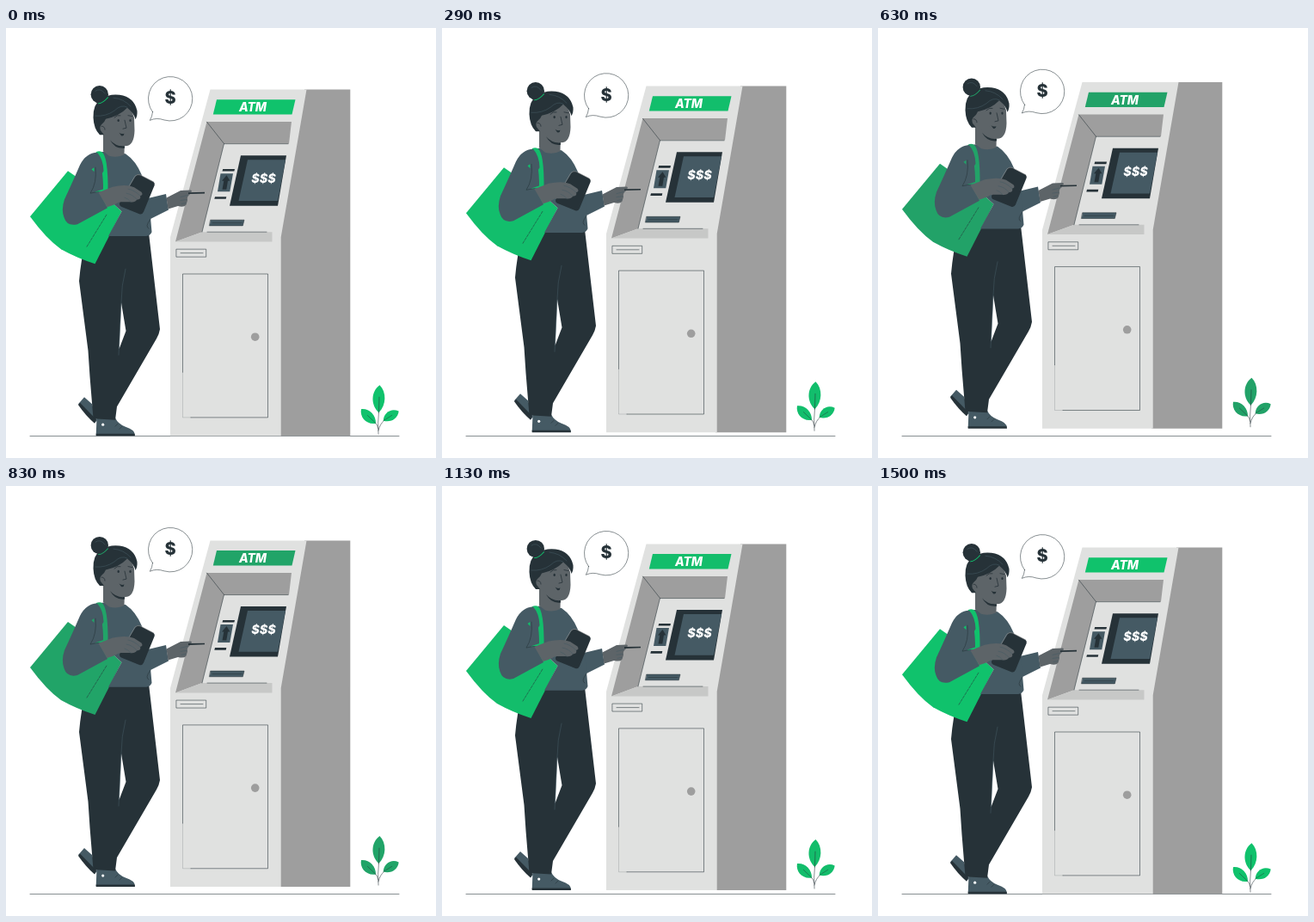
An HTML page that plays this animation: 500 px wide and 500 px high, repeating every 1.54 s.

```html
<!DOCTYPE html>
<html lang="en">
<head>
<meta charset="utf-8">
<title>At the cash machine</title>
<style>
  html, body { margin: 0; width: 100%; height: 100%; overflow: hidden; background: #fff; }
  svg { display: block; width: 100%; height: 100%; }
  text { font-family: Inter, sans-serif; font-weight: 800; text-anchor: middle; }
  .dark { fill: #263238; }
  .slate { fill: #455a64; }
  .skin { fill: #5d6468; }
  .grey { fill: #9e9e9e; }
  .light { fill: #e0e1e0; }
  .green { fill: var(--green); }
  .white { fill: #fff; }
  .line { fill: none; stroke: #263238; stroke-width: .55; stroke-linecap: round; stroke-linejoin: round; }
</style>
</head>
<body>
<svg viewBox="0 0 500 500">
  <defs>
    <g id="leaf">
      <path class="green" d="M0 0C-10 -9 -9 -25 1 -32C9 -24 9 -9 0 0Z"/>
      <path class="line" d="M0 0L.5 -18"/>
    </g>
  </defs>
  <path class="line" d="M28 474.5H457"/>
  <g id="scene">
    <g id="bubble">
      <path class="line" d="M170.5 97.5A25.7 25.7 0 1 1 184 106.8Q175 103.6 167.3 107.2Q170 103 170.5 97.5Z"/>
      <text class="dark" x="191" y="88.2" font-size="20">$</text>
    </g>

    <g id="machine">
      <path class="grey" d="M347 71.3H400.3V474H318V242Z"/>
      <path class="light" d="M237.5 71.3H349.5L319.7 243V474H191V243Z"/>
      <path class="green" d="M245 83H336.5L332.5 100.3H240.8Z"/>
      <text class="white" x="287" y="97" font-size="14" font-style="italic">ATM</text>
      <path class="grey" d="M233.5 108.8H332L329 134.3H253.5L228 237L197 248.3Z"/>
      <path d="M228 237H309.5V248.3H197Z" fill="#c7c8c7"/>
      <path class="line" d="M233.5 109L253.5 134.3L228 237M253.5 134.5H328M234 237H303"/>
      <path class="dark" d="M273 148H326L316 206.5H260Z"/>
      <path class="slate" d="M281 153H325L316 200.7H270.5Z"/>
      <text class="white" x="299.5" y="180" font-size="14.4" font-style="italic">$$$</text>
      <path class="dark" d="M252.2 163.8H266L265.4 166.4H251.5ZM243 196H256.3L255.7 198.6H242.3Z"/>
      <path class="slate" d="M249.5 169H264L260.3 190H246Z"/>
      <path class="dark" d="M256.5 171L260.5 177.5H258L256.3 187.5H251.5L253.3 177.5H251Z"/>
      <path class="slate" d="M238 223H277L275.3 229.7H236.7Z"/>
      <path class="line" d="M238 223H277L275.3 229.7H236.7ZM240 226.5H274"/>
      <path class="line" d="M198.3 257H232.7V266H198.3ZM203 261.5H229"/>
      <path class="line" d="M205.5 400V285.8H304.5V452.7H215"/>
      <path class="line" d="M205.5 400V452.7H215" opacity=".3"/>
      <circle class="grey" cx="289.7" cy="359" r="4.8"/>
    </g>

    <g id="plant">
      <path class="line" d="M433 472Q432 460 433.5 446M433 466Q432 461 429.5 459M433 468Q435 460 439 457"/>
      <use href="#leaf" transform="translate(433.5 447)"/>
      <use href="#leaf" transform="translate(430 459.5) rotate(-48) scale(.85 .74)"/>
      <use href="#leaf" transform="translate(438.7 456.5) rotate(56) scale(.8 .66)"/>
    </g>

    <g id="woman">
      <path class="slate" d="M91 429L100 437L106 456L103 459L84 437Z"/>
      <path class="dark" d="M86 435.5L105 455L103 459.5Q93 451 84 438Z"/>
      <path class="slate" d="M104.7 473L105.5 453H127Q130 460 139 463.5Q150 467 150 473Z"/>
      <path class="dark" d="M104.7 471.5H149.5L150 474H104.7Z"/>
      <path class="line" d="M127 463L130 460M132 466L135 463"/>
      <circle class="white" cx="112.7" cy="461" r="1.6"/>
      <path class="dark" d="M94 238H166L179 350Q178 356 175 361L129 440L127 455.5L101.5 454L97.5 405L95.5 375L85 294Q87 270 94 238ZM134 319L131.5 373L139.5 352Z" fill-rule="evenodd"/>
      <path class="line" d="M139 280Q134 300 134 319L131 380" style="stroke:#455a64"/>

      <path class="green" d="M72 166L28 219Q47 245 64 257Q82 267 103.5 274L134.5 213L118 198Z"/>

      <g transform="translate(0 1.3)">
        <path class="slate" d="M163 197L186 191.5L189 210L165 222Z"/>
        <path class="skin" d="M186.5 196L203 187.5L215 187Q218 189 212 190.5L214 192Q210 194 211 199L209.5 204Q207 207.5 200 205.5L188.5 209Z"/>
        <path class="line" d="M203 195L211 193M203 199L210 198M204 203L209 202" style="stroke:#455a64"/>
      </g>
      <path class="dark" d="M212 191L231 190.6V192.2L212 192.8Z"/>

      <path class="slate" d="M113 143.5L139 146Q151 154 158 171L166 197L169.5 237Q168 241 163 241.7H119L134.5 213L118 198L98 192L104 146Z"/>
      <path class="line" d="M168 222Q161 231 166 233"/>
      <path class="green" d="M103.5 145.5Q106 142 111 143.5Q119 148 118.5 192L113 190Q113.5 157 103.5 145.5Z"/>
      <path class="slate" d="M106 144.5Q93 145 86 159Q76 182 68 199Q64 211 67.5 220Q71 231 83 228L118 209L108 190L98 192L113.5 166Q113 152 106 144.5Z"/>
      <path class="line" d="M104 162Q106 180 98 192L108 190"/>
      <path class="green" d="M99.5 164L102.5 162V167ZM103 190.5L113.5 187V190L108 190Z"/>
      <path class="line" d="M94 254L117.5 216" stroke-dasharray="3 1.5"/>

      <path class="dark" d="M151 171.5Q153 169.5 156 170.6L171 178.4Q173.5 180 172.5 183L160 213.5Q158.5 217 155 216L134 207.5Q131 206 132.5 202Z"/>
      <path class="line" d="M132.5 202L150 172Q153 169.5 156 170.6L171 178.4" style="stroke:#9e9e9e"/>
      <path class="skin" d="M107.5 191L124 184.5Q140 181 149 185L157.5 190.5Q160 194 156 195Q157.5 199 152 199.5Q150 203 144 202L132 202Q125 206 117.5 208Z"/>
      <path class="line" d="M142 187Q149 188 156 195M140 192Q147 193 152 199M138 197Q142 198 145 202" style="stroke:#455a64"/>

      <path class="skin" d="M113 112L138 128L137.5 147Q130 151 120 148.5L113 143Z"/>
      <path class="dark" d="M121 130Q128 138 138 137V139.5Q127 141 121 130Z"/>
      <path class="skin" d="M106 107L138 88Q146 93 149 104L149.5 119Q149 137 138.5 137Q127 137 120 126Q108 124 106 114Z"/>
      <circle class="dark" cx="108.8" cy="77" r="10.2"/>
      <path class="dark" d="M101.5 104Q101 88 111 82Q120 76 132 77.5Q149 80 152.5 96Q153 102 150.5 106Q149 99 141 92.5Q132 102 116 105.5Q114 110 112 111Q108 114 110 119L114 124L109 124Q102 117 101.5 104Z"/>
      <path class="green" d="M107.5 87Q112 87.5 118.5 79.8L119 80.8Q112 88.5 107 88Z"/>
      <path class="line" d="M104 102Q116 103 126 96Q134 88 141 92M125 81Q137 82 145 91M104 73Q110 69 115 76" style="stroke:#455a64"/>
      <path class="line" d="M126 104Q129 100.5 133 101.5M142 101.5L147 102.5M138 107L140 116L136 117M111 114Q115 114 115 118" style="stroke-width:.8"/>
      <ellipse class="dark" cx="130.7" cy="107.3" rx="1.2" ry="1.6"/>
      <ellipse class="dark" cx="144.5" cy="107.3" rx="1.1" ry="1.6"/>
      <path class="dark" d="M131.5 121.5Q134 123.5 137.5 122.5Q137 126 134 125Z"/>
    </g>
  </g>
</svg>
<script>
  const LOOP = 1540, FLOAT = 1500, RISE = 10, LEAD = 30, REST = .6;
  const scene = document.getElementById('scene');
  const start = performance.now();

  function draw(now) {
    const phase = ((now % LOOP + LEAD) % FLOAT) / FLOAT;
    const lift = RISE * (1 - Math.abs(1 - 2 * phase));
    const fade = Math.min((lift / RISE) ** 3, .65);
    scene.setAttribute('transform', `translate(0 ${REST - lift})`);
    document.body.style.setProperty('--green', `rgb(${16 + 28 * fade}, ${194 - 49 * fade}, ${108 - 6 * fade})`);
  }

  function tick() {
    draw(performance.now() - start);
    requestAnimationFrame(tick);
  }
  tick();
</script>
</body>
</html>
```
